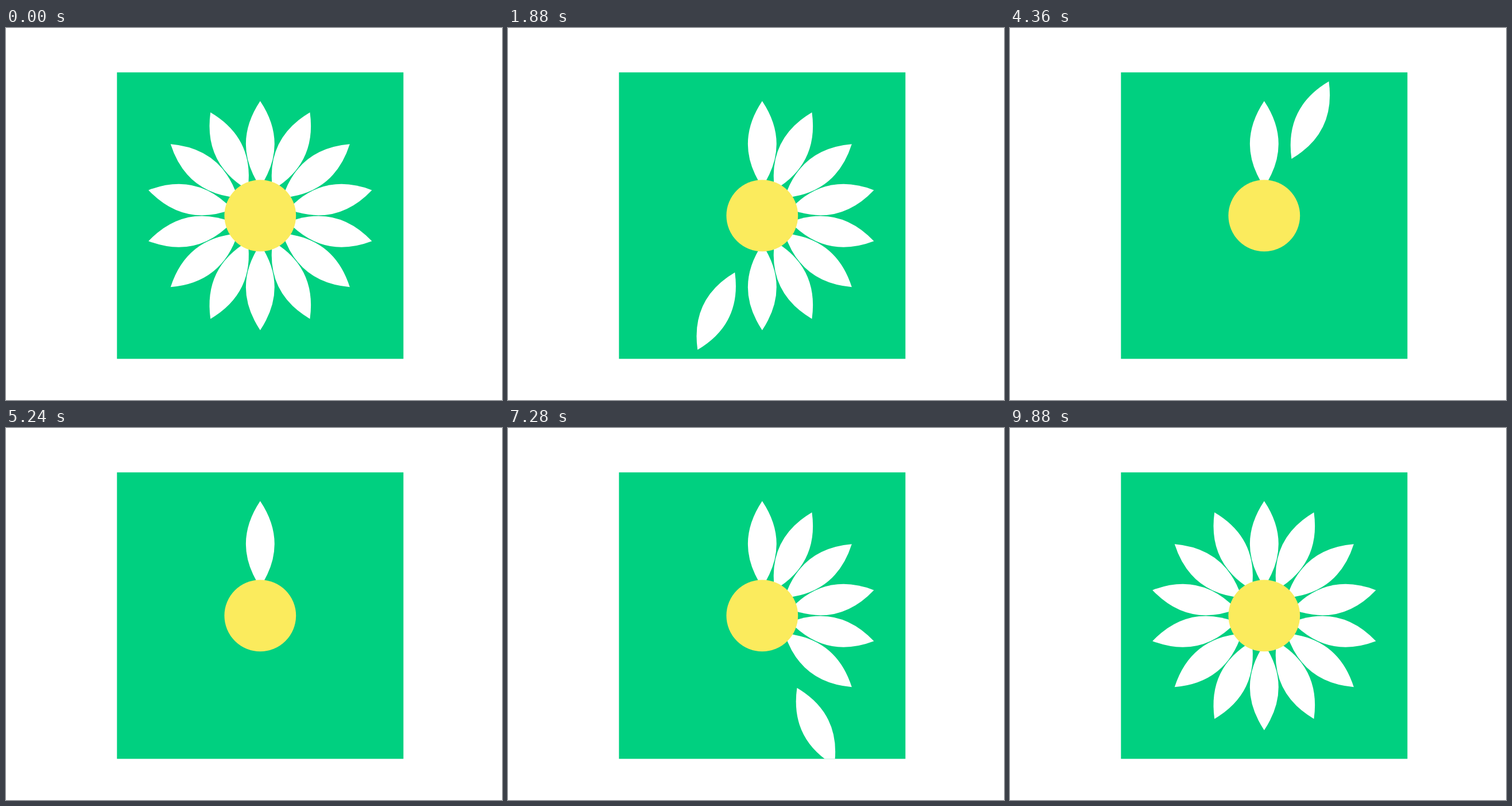
An HTML page for the animation above (9920 ms loop, 864 px wide and 648 px high).

```html
<!DOCTYPE html>
<html lang="en">
<head>
<meta charset="utf-8">
<title>Daisy</title>
<style>
  html, body { margin: 0; width: 100%; height: 100%; overflow: hidden; background: #fff; }
  svg { display: block; }
</style>
</head>
<body>
<svg width="864" height="648" viewBox="0 0 864 648">
  <defs>
    <clipPath id="field"><rect x="-250" y="-250" width="500" height="500"/></clipPath>
  </defs>
  <g transform="translate(442.8 326.8) scale(.998)">
    <rect x="-250" y="-250" width="500" height="500" fill="#00d080"/>
    <g clip-path="url(#field)"><g id="petals" fill="#fff"></g></g>
    <circle r="62.5" fill="#fbeb5d"/>
  </g>
</svg>
<script>
const COUNT = 14, STEP = 30, TICK = 40, HALF = 250, BASE = 50;
const PETAL = 'M0-200Q50-125 0-50Q-50-125 0-200Z';

// Petals leave counter-clockwise; each takes as many ticks as it needs to clear the square.
let total = 0;
const petals = Array.from({ length: COUNT }, (_, i) => {
  const angle = -360 / COUNT * (i + 1);
  const rad = angle * Math.PI / 180;
  const reach = HALF / Math.max(Math.abs(Math.sin(rad)), Math.abs(Math.cos(rad)));
  const last = Math.ceil((reach - BASE) / STEP);
  const node = document.createElementNS('http://www.w3.org/2000/svg', 'path');
  node.setAttribute('d', PETAL);
  document.getElementById('petals').append(node);
  const petal = { node, angle, last, start: total };
  total += last + 1;
  return petal;
});

function draw(time) {
  const tick = Math.floor(time / TICK) % (2 * total);
  const pos = tick < total ? tick : 2 * total - 1 - tick; // out, then back in
  for (const { node, angle, last, start } of petals) {
    const step = Math.max(0, Math.min(last, pos - start));
    node.setAttribute('transform', `rotate(${angle}) translate(0 ${-step * STEP})`);
    node.setAttribute('visibility', step < last ? 'visible' : 'hidden');
  }
}

const begin = performance.now();
function loop() {
  draw(performance.now() - begin);
  requestAnimationFrame(loop);
}
loop();
</script>
</body>
</html>
```
